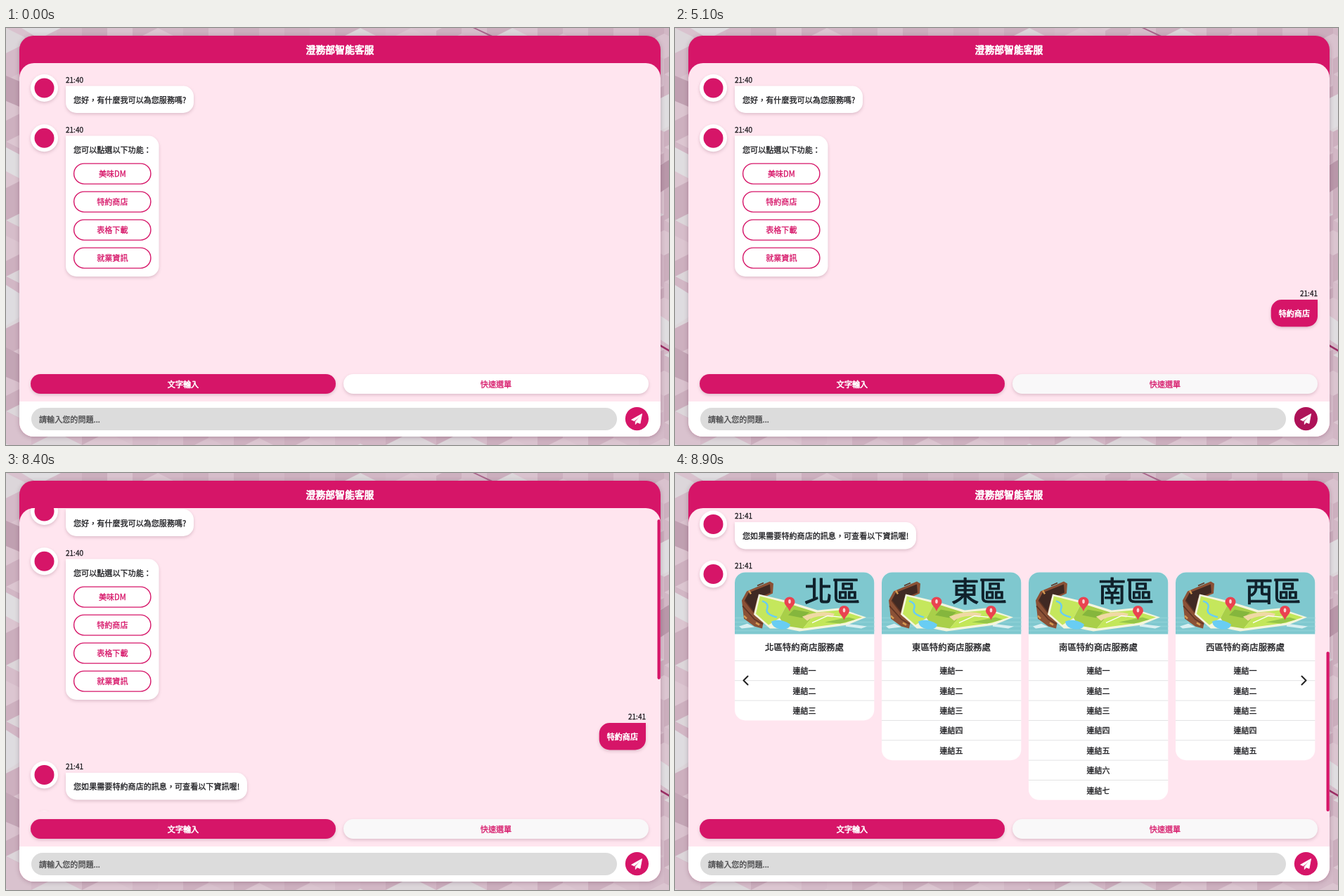
These frames come from a looping animation (943x594 px, 9400 ms). An HTML page:

```html
<!DOCTYPE html>
<html lang="zh-Hant">
<head>
<meta charset="utf-8">
<title>智能客服</title>
<style>
  html, body { margin: 0; width: 100%; height: 100%; overflow: hidden; background: #d9c3ce; }
  svg { display: block; width: 943px; height: 594px; }
  text { font-family: "Noto Sans CJK TC", "Noto Sans CJK", "Noto Sans", sans-serif; white-space: pre; stroke-linejoin: round; }
  .lift { filter: drop-shadow(0 2px 2px rgba(60, 0, 30, .17)); }
</style>
</head>
<body>
<svg id="stage" viewBox="0 0 943 594" xmlns="http://www.w3.org/2000/svg"></svg>
<script>
const LOOP = 9400;
const PINK = '#d61568', INK = '#1b1b1f', EM = 11.08;
// stroke per em that thickens the regular face
const MEDIUM = .027, BOLD = .062;

// ---------- drawing helpers ----------
const poly = (points, fill, extra = '') => `<polygon points="${points}" fill="${fill}" ${extra}/>`;
const path = (d, fill, extra = '') => `<path d="${d}" fill="${fill}" ${extra}/>`;
const rect = (x, y, w, h, r, fill, extra = '') =>
  `<rect x="${x}" y="${y}" width="${w}" height="${h}" rx="${r}" fill="${fill}" ${extra}/>`;

// y is the vertical middle of the glyphs
const label = (x, y, str, { size = EM, fill = INK, anchor = 'start', weight = MEDIUM, id = '' } = {}) =>
  `<text ${id && `id="${id}"`} x="${x}" y="${(y + size * .38).toFixed(2)}" font-size="${size}" fill="${fill}"
    text-anchor="${anchor}" stroke="${fill}" stroke-width="${size * weight}">${str}</text>`;

// rounded box with a radius for each corner: tl, tr, br, bl
const box = (x, y, w, h, [a, b, c, d], fill, extra = '') => path(
  `M${x + a} ${y}H${x + w - b}a${b} ${b} 0 0 1 ${b} ${b}V${y + h - c}a${c} ${c} 0 0 1 ${-c} ${c}` +
  `H${x + d}a${d} ${d} 0 0 1 ${-d} ${-d}V${y + a}a${a} ${a} 0 0 1 ${a} ${-a}z`, fill, extra);

// ---------- backdrop of pale blocks ----------
function backdrop() {
  let seed = 17;
  const rnd = () => (seed = seed * 16807 % 2147483647) / 2147483647;
  const tops = ['#dcc6d1', '#dcd6da', '#d9c2ce', '#dbc5d0'];
  const lefts = ['#d6bdca', '#d2b7c5', '#d9c2ce'];
  const rights = ['#cdb0bf', '#d4bac8', '#cbaebd'];
  const pick = list => list[Math.floor(rnd() * list.length)];
  let out = rect(0, 0, 943, 594, 0, '#d9c3ce');
  const w = 36, h = 18;
  for (let row = -1; row < 13; row++) for (let col = -1; col < 15; col++) {
    const x = col * w * 2 + (row % 2 ? w : 0), y = row * 48 + Math.floor(rnd() * 3) * 8;
    out += poly(`${x},${y} ${x + w},${y + h} ${x},${y + 2 * h} ${x - w},${y + h}`, pick(tops))
      + poly(`${x - w},${y + h} ${x},${y + 2 * h} ${x},${y + 86} ${x - w},${y + 68}`, pick(lefts))
      + poly(`${x + w},${y + h} ${x},${y + 2 * h} ${x},${y + 86} ${x + w},${y + 68}`, pick(rights));
  }
  return out
    + poly('0,68 19,76 19,112 0,104', '#c0a0b1') + poly('0,170 19,180 19,214 0,204', '#dfdde0')
    + poly('0,366 19,378 19,412 0,424', '#dedce0') + poly('0,455 19,465 19,505 0,497', '#c3a5b5')
    + poly('931,100 943,94 943,140 931,146', '#dfdde0') + poly('931,195 943,188 943,226 931,234', '#b997a9')
    + poly('931,410 943,418 943,452 931,444', '#dfdde0') + poly('931,451 943,458 943,461 931,454', '#9d2f66')
    + poly('664,0 668,0 692,11 687,11', '#a8648a') + poly('22,0 78,0 56,11 40,11', '#dfdde0');
}

// ---------- conversation ----------
const avatar = (x, y) =>
  `<circle cx="${x}" cy="${y}" r="19.5" fill="#fff" class="lift"/><circle cx="${x}" cy="${y}" r="14" fill="${PINK}"/>`;

const botRow = (y, time, body) => avatar(54.5, y + 11.5) + label(85, y, time, { size: 10 }) + body;
const bubble = (y, w, h) => box(85, y, w, h, [0, 15, 15, 15], '#fff', 'class="lift"');

const options = ['美味DM', '特約商店', '表格下載', '就業資訊'].map((name, i) => {
  const y = 207.6 + i * 40;
  return rect(96.6, y - 14.5, 109.3, 29, 14.5, '#fff', `stroke="${PINK}" stroke-width="1.4"`)
    + label(151.3, y + .4, name, { fill: PINK, anchor: 'middle' });
}).join('');

const pin = (x, y) =>
  path(`M${x} ${y + 12}C${x - 2} ${y + 6} ${x - 7.5} ${y + 3} ${x - 7.5} ${y - 1.5}a7.5 7 0 0 1 15 0C${x + 7.5} ${y + 3} ${x + 2} ${y + 6} ${x} ${y + 12}z`, '#ea4250')
  + `<ellipse cx="${x}" cy="${y - 2}" rx="1.8" ry="3" fill="#f7d6d4"/>`;

// open suitcase with an unfolded map, 198 x 88
const mapArt = `<g id="mapArt">
  ${box(0, 0, 198.3, 88, [15, 15, 0, 0], '#7fc8cf')}
  ${[64, 70, 76, 82].map(y => rect(0, y, 198.3, 2, 0, '#8ccfd5')).join('')}
  ${path('M6 77l12 -4 10 5 -18 2zM158 73l30 4 -8 3 -22 -3z', '#d9eff1')}
  ${path('M10 40L17 27L50 13L55 16L54 30L34 39L29 62L41 70L39 80L28 77L13 66z', '#8b5136')}
  ${poly('14,40 20,29 50,17 51,29 32,37 27,57', '#402923')}
  ${path('M14 40L27 57M11 48L28 67L40 74M32 19l9 -4', 'none', 'stroke="#5f3424" stroke-width="1.6"')}
  ${path('M13 62l4 4M30 72l5 3M20 26l3 5', 'none', 'stroke="#d59a52" stroke-width="2.4"')}
  ${poly('27,60 34,31 76,41 118,54 148,51 187,64 160,75 92,84 72,80 50,80', '#f4f5dd')}
  ${poly('30,59 36,34 75,44 64,65 48,75', '#c5e75c')}
  ${poly('75,44 116,57 97,80 71,76 64,65', '#a9cf49')}
  ${poly('116,57 148,54 181,64 157,72 97,80', '#c3e75a')}
  ${poly('84,53 106,57 96,65 76,61', '#85b63d')}
  ${poly('128,71 162,64 172,67 150,73', '#94c548')}
  ${path('M96 63q26 -10 46 -4l-3 5q-22 -5 -36 5z', '#f0d9a4')}
  ${path('M52 70q12 -5 27 4q-1 8 -14 7q-12 -2 -13 -11z', '#69cdf3')}
  ${path('M39 41q10 3 7 11t14 12', 'none', 'stroke="#69cdf3" stroke-width="2.5"')}
  ${path('M110 72l22 -10 20 2', 'none', 'stroke="#fff" stroke-width="1.2"')}
  ${pin(78, 43.5)}${pin(155.5, 56)}
</g>`;

const CARDS_Y = 529.4, ROW_H = 28.35;
function card(region, count, i) {
  const x = 85 + i * 209, mid = x + 99;
  let out = rect(x, CARDS_Y, 198.3, 126 + ROW_H * count, 15, '#fff')
    + `<use href="#mapArt" x="${x}" y="${CARDS_Y}"/>`
    + label(mid + 39.5, CARDS_Y + 26.5, region, { size: 39.5, fill: '#10212b', anchor: 'middle' })
    + label(mid, CARDS_Y + 107.3, region + '特約商店服務處', { size: 12.46, anchor: 'middle' });
  for (let n = 0; n < count; n++) {
    const y = CARDS_Y + 126 + n * ROW_H;
    out += rect(x, y - .4, 198.3, .8, 0, '#dcdcde')
      + label(mid, y + 14.8, '連結' + '一二三四五六七'[n], { anchor: 'middle' });
  }
  return out;
}
const cards = [['北區', 3], ['東區', 5], ['南區', 7], ['西區', 5]].map(([r, n], i) => card(r, n, i)).join('');
const arrows = path('M103.5 677.5l-6 6 6 6M891.5 677.5l6 6 -6 6', 'none',
  'stroke="#222" stroke-width="2" stroke-linecap="round" stroke-linejoin="round"');

// ---------- scene ----------
const stage = document.getElementById('stage');
stage.innerHTML = `
<defs>${mapArt}<clipPath id="view">${box(19, 50, 912, 432, [21, 21, 0, 0], '#000')}</clipPath></defs>
${backdrop()}
${rect(19, 11, 912, 571, 20, PINK, 'style="filter:drop-shadow(0 1px 3px rgba(60,0,30,.25))"')}
${label(475, 31.2, '澄務部智能客服', { size: 13.85, fill: '#fff', anchor: 'middle', weight: BOLD })}
${box(19, 50, 912, 532, [21, 21, 20, 20], '#ffe5ef')}
${box(19, 532, 912, 50, [0, 0, 20, 20], '#fff')}
<g clip-path="url(#view)">
  <g id="content">
    ${botRow(74, '21:40', bubble(82.5, 182, 38.5) + label(96, 102.3, '您好，有什麼我可以為您服務嗎?'))}
    ${botRow(145.3, '21:40', bubble(153.5, 132.5, 200.5) + label(96, 173.5, '您可以點選以下功能：') + options)}
    <g id="userRow">
      ${label(914, 378.3, '21:41', { size: 10, anchor: 'end' })}
      ${box(847.7, 387, 66.3, 38.5, [15, 0, 15, 15], PINK, 'class="lift"')}
      ${label(880.8, 406.7, '特約商店', { fill: '#fff', anchor: 'middle', weight: BOLD })}
    </g>
    <g id="replyRow">
      ${botRow(449.5, '21:41', bubble(458, 258, 38.5) + label(96, 477.5, '您如果需要特約商店的訊息，可查看以下資訊喔!'))}
    </g>
    <g id="cardRow">${botRow(520.6, '21:41', cards + arrows)}</g>
  </g>
  ${rect(926.5, 50, 4.3, 10, 2.1, PINK, 'id="thumb"')}
</g>
${rect(35, 493, 434, 28, 14, PINK, 'class="lift"')}
${label(252, 507.5, '文字輸入', { fill: '#fff', anchor: 'middle', weight: BOLD })}
${rect(480, 493, 434, 28, 14, '#fff', 'id="quickTab" class="lift"')}
${label(697, 507.5, '快速選單', { fill: PINK, anchor: 'middle' })}
${rect(32.5, 537.5, 840, 38.5, 19.2, '#f5c0d5', 'id="ring"')}
${rect(36, 541, 833, 32, 16, '#dcdcdc')}
${label(47, 557.5, '', { id: 'entry' })}
${rect(47, 564, 0, .9, 0, INK, 'id="underline"')}
${rect(47, 548.5, 1, 16, 0, INK, 'id="caret"')}
<circle id="send" cx="897.4" cy="556.6" r="16.6"/>
${path('M904.6 549.6L889.6 558L893.6 559.8L902.2 552.6L895.3 560.6V564.6L897.7 561.8L902 563.4z', '#fff',
  'stroke="#fff" stroke-width=".8" stroke-linejoin="round"')}`;

// ---------- motion ----------
const el = Object.fromEntries([...stage.querySelectorAll('[id]')].map(node => [node.id, node]));
const set = (node, attrs) => { for (const key in attrs) node.setAttribute(key, attrs[key]); };
const ramp = (t, from, to) => Math.min(1, Math.max(0, (t - from) / (to - from)));
const inOut = p => p * p * (3 - 2 * p);
const out = p => 1 - (1 - p) ** 3;
const mix = (a, b, p) => `rgb(${a.map((v, i) => Math.round(v + (b[i] - v) * p))})`;

const HINT = '請輸入您的問題...';
const typing = [
  [800, 'ㄊ'], [1300, 'ㄊㄜ'], [1500, '特'], [1700, '特ㄩ'], [1900, '特ㄩㄝ'], [2000, '特ㄩㄝㄕ'],
  [2300, '特ㄩㄝ'], [2500, '特約'], [2700, '特約ㄕ'], [2900, '特約ㄕㄤ'], [3000, '特約商'],
  [3100, '特約商ㄉㄧㄢ'], [3200, '特約商店'], [4500, '']
];
const FOCUS = 500, COMMIT = 3200, SEND = 4500, REPLY = 5550, CARDS = 8400;

function drawEntry(t) {
  const typed = typing.reduce((now, [at, str]) => t >= at ? str : now, '');
  const width = typed.length * EM;
  const color = typed ? INK : '#48484a';
  el.entry.textContent = typed || HINT;
  set(el.entry, { fill: color, stroke: color });
  set(el.underline, { width: t < COMMIT ? width : 0 });
  const blinkOff = (t >= 1200 && t < 1300) || (t >= 3700 && t < 4200);
  set(el.caret, { x: 47 + width - (typed ? .4 : 0), opacity: t >= FOCUS && t < SEND && !blinkOff ? 1 : 0 });
  set(el.ring, { opacity: ramp(t, FOCUS - 60, FOCUS + 100) * (1 - ramp(t, SEND, SEND + 150)) });
}

function drawChat(t) {
  const scroll = 31 * inOut(ramp(t, 6550, 7150)) + 357 * inOut(ramp(t, CARDS, CARDS + 490));
  const total = t >= CARDS ? 820 : 463;
  const overflow = t >= REPLY;
  set(el.content, { transform: `translate(0 ${-scroll})` });
  set(el.thumb, { y: 50 + scroll * 432 / total, height: 432 * 432 / total, opacity: overflow ? 1 : 0 });

  const user = out(ramp(t, SEND, SEND + 600));
  set(el.userRow, { transform: `translate(${(1 - user) * 100 - (overflow ? 4 : 0)} 0)`, opacity: user });
  const reply = out(ramp(t, REPLY, REPLY + 750));
  set(el.replyRow, { transform: `translate(${(reply - 1) * 100} 0)`, opacity: reply });
  set(el.cardRow, { opacity: t >= CARDS ? 1 : 0 });
}

function draw(t) {
  drawEntry(t);
  drawChat(t);
  set(el.quickTab, { fill: mix([255, 255, 255], [249, 248, 249], ramp(t, 50, 300)) });
  const hover = ramp(t, 4350, 4550) * (1 - ramp(t, 7250, 7500));
  set(el.send, { fill: mix([214, 21, 104], [174, 18, 88], hover) });
}

const start = performance.now();
function tick() {
  draw((performance.now() - start) % LOOP);
  requestAnimationFrame(tick);
}
tick();
</script>
</body>
</html>
```
